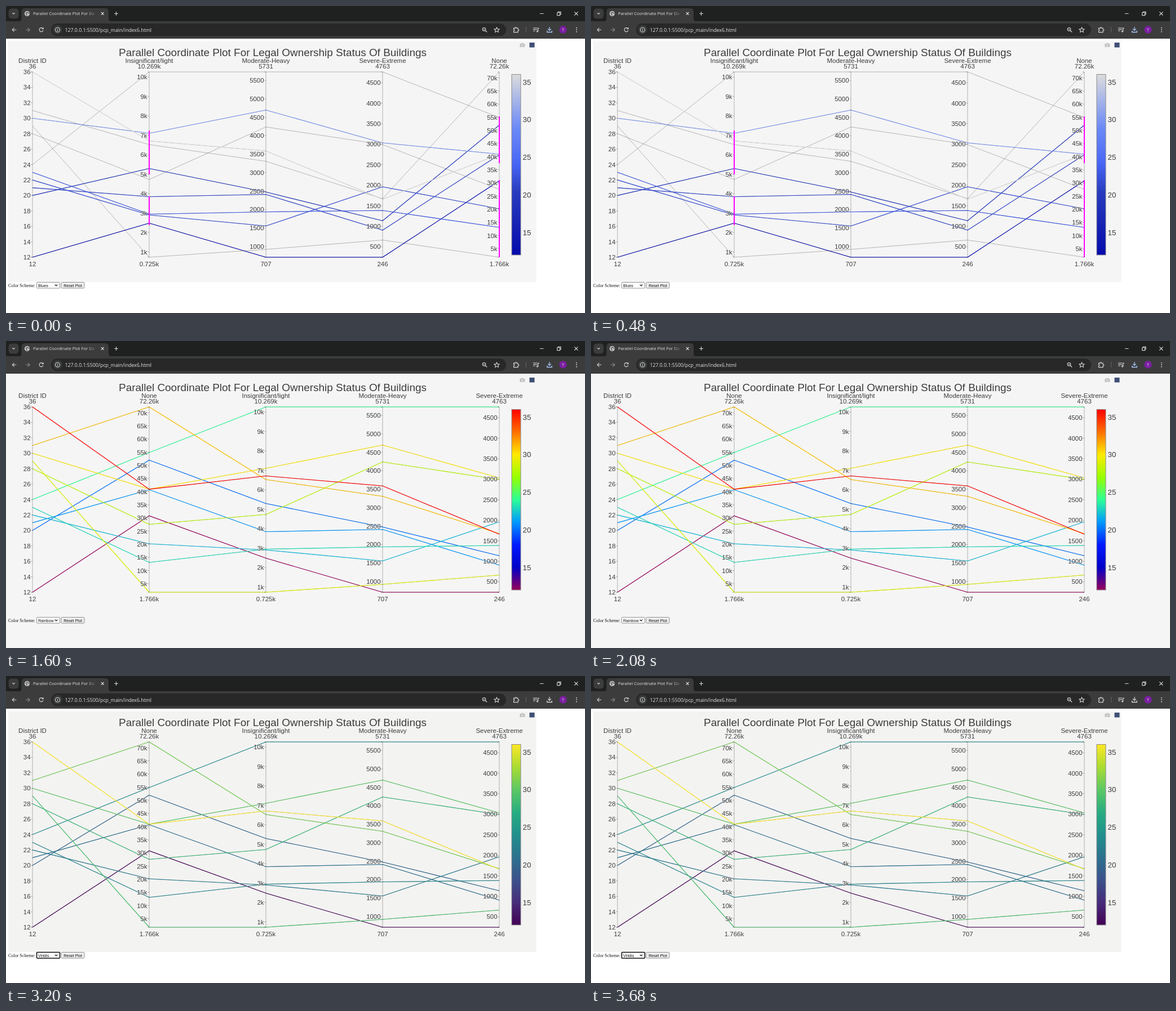
An HTML page for the animation above (4000 ms loop, 1027 px wide and 545 px high).

```html
<!DOCTYPE html>
<html lang="en">
<head>
<meta charset="utf-8">
<title>Parallel Coordinate Plot</title>
<style>
html, body { margin: 0; width: 100%; height: 100%; overflow: hidden; background: #fff; }
svg { display: block; }
text { font-family: "Liberation Sans", Arial, sans-serif; fill: #3c3c3c; white-space: pre; }
.ui text { font-family: "Open Sans", sans-serif; fill: #e3e3e3; }
.icon { fill: none; stroke: #d6d6d6; stroke-width: 1.1; }
.tick { paint-order: stroke; stroke: #f5f5f5; stroke-width: .8; }
.form text { fill: #111; font-size: 7.1px; }
.line { fill: none; stroke-linejoin: round; }
</style>
</head>
<body>
<svg id="stage" width="1027" height="545" viewBox="0 0 1027 545">
  <g id="scenes"></g>

  <g class="ui">
    <rect width="1027" height="28" fill="#1f2020"/>
    <rect y="27" width="1027" height="31" fill="#3c3c3c"/>
    <path d="M22 27.5q5.500 0 5.500-5.500V10q0-6 6-6H176q6 0 6 6v12q0 5.500 5.500 5.500z" fill="#3c3c3c"/>
    <rect x="4.500" y="4.500" width="18" height="18" rx="5.500" fill="#3c3c3c"/>
    <rect x="80" y="31" width="807" height="22.500" rx="11.250" fill="#282828"/>
    <circle cx="91.500" cy="42" r="8" fill="#3a3b3b"/>

    <circle cx="37.500" cy="13.500" r="4.700" fill="#c4c7c5"/>
    <path d="M34.200 12.200l2.600 1-.4 2 1.200 1.800M37 9.800l.6 1.800 2.600.4 1 2" fill="none" stroke="#4a4a4a" stroke-width="1.200"/>
    <text x="48" y="16.300" font-size="7.650">Parallel Coordinate Plot For Da</text>
    <rect x="144" y="7" width="20" height="13" fill="url(#fade)"/>
    <text x="104.500" y="45.500" font-size="8.760">127.0.0.1:5500/pcp_main/index6.html</text>

    <g class="icon">
      <path d="M11.300 12.200l2.200 2.200 2.200-2.200"/>
      <path d="M168.800 11l4.800 4.800m0-4.800l-4.800 4.800M192 13.500h7m-3.500-3.500v7"/>
      <path d="M947 13.500h6.500M1008.300 10.300l6.200 6.200m0-6.200l-6.200 6.200"/>
      <path d="M977.700 11.800h4.800v4.800h-4.800zM979.300 11.500v-1.300h4.800v4.800h-1.300"/>
      <path d="M18.300 42.200h-7m3.300-3.400l-3.400 3.400 3.400 3.400"/>
      <path d="M35 42.200h7m-3.300-3.400l3.400 3.400-3.400 3.400" stroke="#8c8c8c"/>
      <path d="M65.900 43.300a3.500 3.500 0 1 1-.6-3.400M66.200 38.200v2.600h-2.700"/>
      <circle cx="91.500" cy="42.200" r="4"/>
      <path d="M91.500 41.600v2.600m0-4.300v.9"/>
      <circle cx="848" cy="41.300" r="2.800"/>
      <path d="M850.200 43.500l3 3M846.600 41.300h2.800"/>
      <path d="M870.500 38l1.350 2.900 3.150.35-2.350 2.100.7 3.150-2.850-1.650-2.850 1.650.7-3.150-2.350-2.100 3.150-.35z"/>
      <path d="M900.500 39.400h2.600q-.3-1.700 1.200-1.700t1.200 1.700h2.600v2.400q1.700-.3 1.700 1.100t-1.700 1.100v2.600h-7.600v-2.600q1.500 0 1.500-1.200t-1.500-1.200z"/>
      <path d="M922.500 37v10" stroke="#626262"/>
      <path d="M935 39h7.500M935 41.500h7.500M935 44h4M943.800 45v-5.600h2"/>
      <circle cx="942.500" cy="45" r="1.100"/>
      <path id="download" d="M964 37.300v6m-2.800-2.700l2.800 2.800 2.800-2.800M959.700 43.800v2.700h8.600v-2.700" stroke-width="1.300"/>
    </g>
    <circle cx="988" cy="42" r="6.700" fill="#7b1fa2"/>
    <text x="988" y="44.800" font-size="7.500" text-anchor="middle">T</text>
    <g fill="#d6d6d6">
      <circle cx="1012" cy="38.700" r=".95"/><circle cx="1012" cy="42.200" r=".95"/><circle cx="1012" cy="45.700" r=".95"/>
    </g>
  </g>

  <text x="473" y="89" font-size="18.930" text-anchor="middle">Parallel Coordinate Plot For Legal Ownership Status Of Buildings</text>
  <path d="M911.500 67h2.300l.8-1.300h2.600l.8 1.300h2.300v5.800h-8.800z" fill="#bcbcbc"/>
  <circle cx="915.900" cy="69.700" r="1.700" fill="#bcbcbc" stroke="#f5f5f5" stroke-width=".9"/>
  <rect x="928.500" y="65" width="9" height="8.500" fill="#3f4f75"/>

  <g class="form">
    <text x="4" y="498.500" style="font-family:'Liberation Serif',Times,serif;font-size:8.050px">Color Scheme:</text>
    <rect id="box" x="54.500" y="490.500" width="41" height="10.500" rx="1" fill="#fff"/>
    <text id="scheme" x="57" y="498.500"></text>
    <path d="M86.800 494.700l2.200 2.200 2.200-2.200" fill="none" stroke="#111" stroke-width="1.200"/>
    <rect x="98" y="490.500" width="41" height="10.500" rx="1.500" fill="#efefef" stroke="#767676" stroke-width=".8"/>
    <text x="118.500" y="498.500" text-anchor="middle">Reset Plot</text>
  </g>

  <defs>
    <linearGradient id="fade">
      <stop stop-color="#3c3c3c" stop-opacity="0"/><stop offset=".85" stop-color="#3c3c3c"/>
    </linearGradient>
  </defs>
</svg>

<script>
const TOP = 117, BOTTOM = 446, LEFT = 47, GAP = 207, HOLD = 800;
const districts = [12, 20, 21, 22, 23, 24, 28, 29, 30, 31, 36];

// Each axis: range, tick step, unit and the height of every district's point.
const axes = {
  D: { name: "District ID", min: 12, max: 36, step: 2, unit: "",
       ys: districts.map(d => TOP + (36 - d) / 24 * (BOTTOM - TOP)) },
  I: { name: "Insignificant/light", min: 0.725, max: 10.269, step: 1, unit: "k",
       ys: [385.5, 288.5, 338.5, 371, 369.5, 117, 308, 446, 226, 246, 239.5] },
  M: { name: "Moderate-Heavy", min: 707, max: 5731, step: 500, unit: "",
       ys: [446, 330.3, 334.5, 390.5, 365.5, 117, 214.7, 432, 184.7, 275.7, 257.3] },
  S: { name: "Severe-Extreme", min: 246, max: 4763, step: 500, unit: "",
       ys: [446, 381.3, 398, 321, 363, 117, 246, 415.5, 243, 342, 343] },
  N: { name: "None", min: 1.766, max: 72.26, step: 5, unit: "k",
       ys: [310.3, 211.5, 264, 360, 393, 198, 325.5, 446, 263, 117, 263.2] }
};

const even = list => list.split(" ").map((c, i, all) => [i / (all.length - 1), c]);
const scales = {
  Blues: [[0, "#050aac"], [.35, "#283cbe"], [.5, "#4664f5"], [.6, "#5a78f5"], [.7, "#6a89f7"], [1, "#dcdcdc"]],
  Greens: even("#00441b #006d2c #238b45 #41ab5d #74c476 #a1d99b #c7e9c0 #e5f5e0 #f7fcf5"),
  Rainbow: even("#96005a #0000c8 #0019ff #0098ff #2cff96 #97ff00 #ffea00 #ff6f00 #ff0000"),
  Reds: [[0, "#dcdcdc"], [.2, "#f5c39d"], [.4, "#f5a069"], [1, "#b20a1c"]],
  Viridis: even("#440154 #472c7a #3b518b #2c718e #21908d #27ad81 #5cc863 #aadc32 #fde725")
};

const scenes = [
  { scale: "Blues", order: "DIMSN", blue: true,
    brushes: { I: [[221, 299], [338, 389]], N: [[196, 279], [309, 446]] } },
  { scale: "Greens", order: "ISDMN", context: "DNIMS" },
  { scale: "Rainbow", order: "DNIMS", page: "#f5f5f5", blue: true },
  { scale: "Reds", order: "NMDSI", brushes: { M: [[117, 368]], S: [[117, 358]], I: [[117, 315]] } },
  { scale: "Viridis", order: "DNIMS", plot: "#f3f3f2", focus: true }
];

const byId = id => document.getElementById(id);

function add(parent, tag, attrs, text = "") {
  const node = document.createElementNS("http://www.w3.org/2000/svg", tag);
  for (const key in attrs) node.setAttribute(key, attrs[key]);
  node.textContent = text;
  return parent.appendChild(node);
}

function colorAt(stops, t) {
  const i = Math.max(1, stops.findIndex(s => s[0] >= t));
  const [[t0, a], [t1, b]] = [stops[i - 1], stops[i]];
  const k = (t - t0) / (t1 - t0);
  const mix = [1, 3, 5].map(p => {
    const [u, v] = [a, b].map(c => parseInt(c.slice(p, p + 2), 16));
    return Math.round(u + (v - u) * k);
  });
  return `rgb(${mix})`;
}

const axisX = i => LEFT + i * GAP;

function drawLine(g, order, row, stroke, width) {
  const points = [...order].map((key, i) => `${axisX(i)},${axes[key].ys[row]}`).join(" ");
  add(g, "polyline", { points, stroke, "stroke-width": width, class: "line" });
}

function drawAxis(g, key, x, ranges) {
  const { name, min, max, step, unit } = axes[key];
  const label = (y, text) =>
    add(g, "text", { x, y, "font-size": 11.5, "text-anchor": "middle", class: "tick" }, text);
  let d = `M${x - 3} ${TOP}h3V${BOTTOM}h-3`;
  for (let v = Math.ceil(min / step) * step; v <= max; v += step) {
    const y = TOP + (max - v) / (max - min) * (BOTTOM - TOP);
    d += `M${x - 3} ${y}h3`;
    add(g, "text", { x: x - 3.5, y: y + 4, "font-size": 11.4, "text-anchor": "end", class: "tick" }, v + unit);
  }
  add(g, "path", { d, fill: "none", stroke: "#000", "stroke-opacity": .28 });
  for (const [a, b] of ranges)
    add(g, "path", { d: `M${x} ${a}V${b}`, stroke: "#f0f", "stroke-width": 2 });
  label(101, name);
  label(110.7, max + unit);
  label(462, min + unit);
}

function drawBar(g, scale) {
  const grad = add(g, "linearGradient", { id: scale, x1: 0, y1: 1, x2: 0, y2: 0 });
  for (const [offset, color] of scales[scale]) add(grad, "stop", { offset, "stop-color": color });
  add(g, "rect", { x: 897, y: 121.5, width: 16, height: 320.5, fill: `url(#${scale})`, stroke: "#8a8a8a" });
  for (let v = 15; v <= 35; v += 5)
    add(g, "text", { x: 916.5, y: 139.5 + (35 - v) * 13.36, "font-size": 13.4 }, v);
}

function buildScene({ scale, order, context = order, brushes = {}, page = "#fff", plot = "#f5f5f5" }) {
  const g = add(byId("scenes"), "g", {});
  add(g, "rect", { y: 58, width: 1027, height: 487, fill: page });
  add(g, "rect", { x: 4, y: 62.5, width: 936.5, height: 427.5, fill: plot });

  const chosen = row => Object.entries(brushes).every(([key, ranges]) =>
    ranges.some(([a, b]) => axes[key].ys[row] >= a && axes[key].ys[row] <= b));
  districts.forEach((_, row) => drawLine(g, context, row, "rgba(0,0,0,.27)", 1));
  districts.forEach((d, row) => {
    if (chosen(row)) drawLine(g, order, row, colorAt(scales[scale], (d - 12) / 24), 1.15);
  });

  [...order].forEach((key, i) => drawAxis(g, key, axisX(i), brushes[key] || []));
  drawBar(g, scale);
  return g;
}

const groups = scenes.map(buildScene);
let shown = -1;

function show(index) {
  shown = index;
  const { scale, blue, focus } = scenes[index];
  groups.forEach((g, i) => g.setAttribute("display", i === index ? "inline" : "none"));
  byId("scheme").textContent = scale;
  byId("download").style.stroke = blue ? "#a8c7fa" : "#d6d6d6";
  byId("box").style.stroke = focus ? "#101010" : "#767676";
  byId("box").style.strokeWidth = focus ? 1.6 : .8;
}

function tick() {
  const index = Math.floor(performance.now() / HOLD) % scenes.length;
  if (index !== shown) show(index);
  requestAnimationFrame(tick);
}
tick();
</script>
</body>
</html>
```
